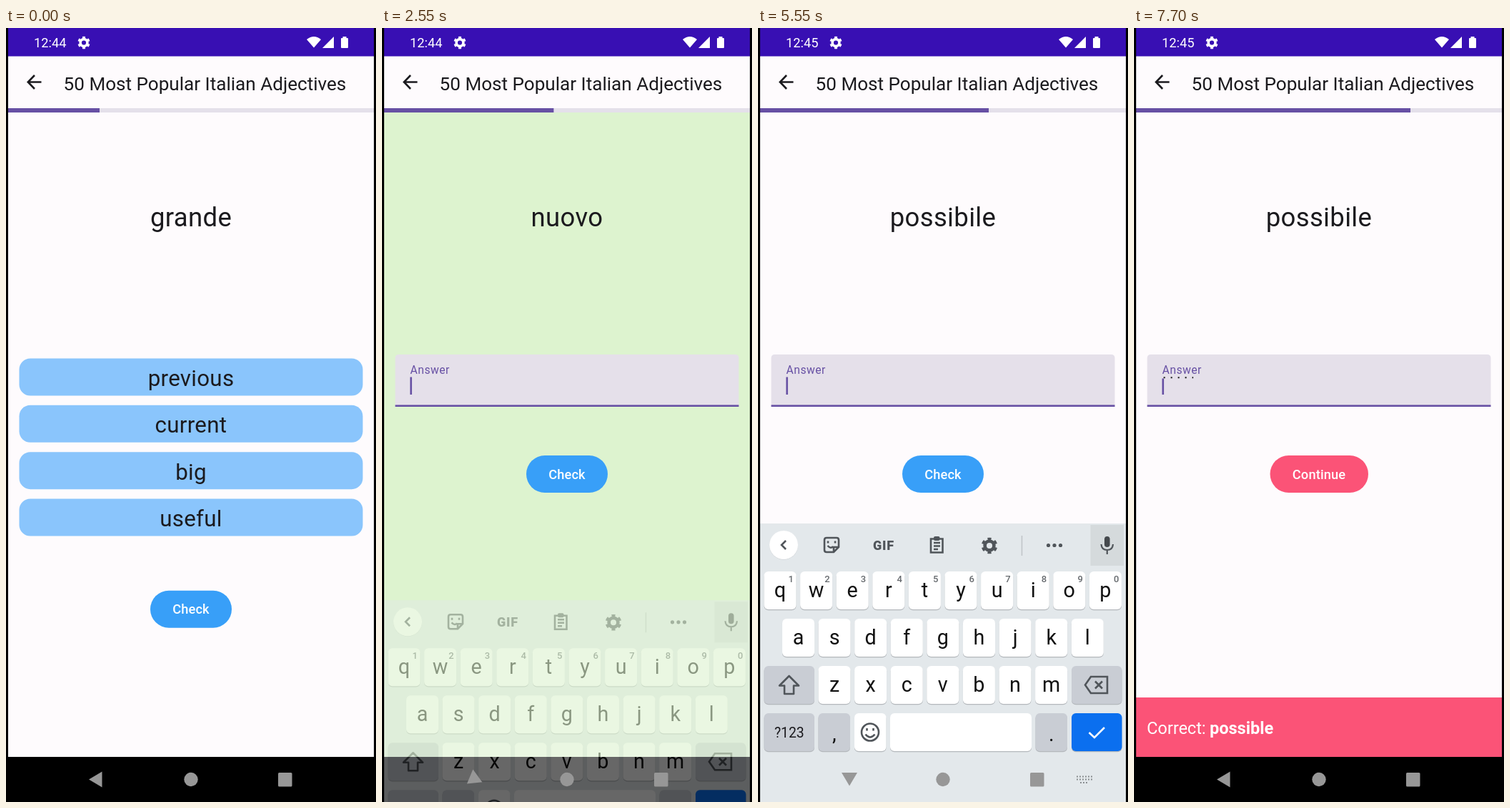
An HTML page for the animation above (8000 ms loop, 518x1081 px).

```html
<!DOCTYPE html>
<html lang="en">
<head>
<meta charset="utf-8">
<title>Vocabulary quiz</title>
<style>
  html, body { margin: 0; width: 100%; height: 100%; overflow: hidden; background: #000; }
  svg { display: block; width: 100%; height: 100%; font-family: Roboto, sans-serif; fill: #1b1a1e; }
  .mid { text-anchor: middle; }
  .word { font-size: 36.5px; letter-spacing: .35px; }
  .option { font-size: 31.3px; letter-spacing: .3px; }
  .button { font-size: 18.26px; font-weight: 500; letter-spacing: .13px; fill: #fff; }
  .line { fill: none; stroke: #50555a; stroke-width: 2.6; }
  .letter { font-size: 28.7px; fill: #111; }
  .hint { font-size: 13px; font-weight: 500; fill: #666a6e; }
  .suggestion { font-size: 20.9px; fill: #222; }
</style>
</head>
<body>
<svg viewBox="0 0 518 1081" preserveAspectRatio="none">
  <defs>
    <g id="gear" fill="none">
      <circle r="4.9" stroke-width="3.6"/>
      <circle r="7.3" stroke-width="2.8" pathLength="12" stroke-dasharray="1 1" stroke-dashoffset="-.5"/>
    </g>
    <clipPath id="screen"><rect x="3" width="512" height="1081"/></clipPath>
  </defs>
  <rect width="518" height="1081" fill="#000"/>
  <g clip-path="url(#screen)">
    <rect y="39" width="518" height="979" fill="#fefbfd"/>
    <rect id="page" y="118" width="518" height="900"/>

    <rect width="518" height="39.5" fill="#380fb3"/>
    <g fill="#fff">
      <text id="clock" x="39" y="27" font-size="18.26"></text>
      <use href="#gear" x="109" y="20.5" stroke="#fff"/>
      <path d="M421 16Q431 8 441 16L431 27.5ZM443 28H459V12ZM471.5 14V12H476.5V14H478Q479 14 479 15V27Q479 28 478 28H470Q469 28 469 27V15Q469 14 470 14Z"/>
    </g>
    <path class="line" style="stroke:#1b1a1e" d="M49.5 75.5H31M40 66L30.8 75.5 40 85"/>
    <text x="80.6" y="86.5" font-size="26.1">50 Most Popular Italian Adjectives</text>
    <rect y="112" width="518" height="6" fill="#e4e0ea"/>
    <rect id="progress" x="3" y="112" height="6" fill="#6750a4"/>

    <text id="word" class="mid word" x="259" y="277"></text>
    <g id="options"></g>
    <g id="field">
      <path d="M18.5 529V461Q18.5 456 23.5 456H494.5Q499.5 456 499.5 461V529Z" fill="#e5e0ea"/>
      <rect x="18.5" y="526.4" width="481" height="2.6" fill="#6750a4"/>
      <text x="39.5" y="482.5" font-size="15.65" letter-spacing=".52" style="fill:#6750a4">Answer</text>
      <text id="typed" x="40" y="507" font-size="20.9" letter-spacing=".65"></text>
      <path id="wrapped" d="M41.5 488.3H83" stroke="#111" stroke-width="2" stroke-dasharray="2 8"/>
      <rect id="cursor" x="39.3" width="2.6" fill="#6750a4"/>
    </g>
    <g id="button">
      <rect id="pill" y="-26" height="52" rx="26"/>
      <text id="action" class="mid button" x="259" y="6.7"></text>
    </g>

    <g id="banner">
      <rect y="935" width="518" height="84" fill="#fb5377"/>
      <text x="18" y="986" font-size="23.5" fill="#fff">Correct: <tspan x="106" font-weight="700">possible</tspan></text>
    </g>
    <rect y="1018" width="518" height="63" fill="#000"/>

    <g id="keyboard">
      <rect y="692" width="518" height="400" fill="#e3e8eb"/>
      <rect x="465.5" y="694" width="46.5" height="57" fill="#d5dadc"/>
      <circle cx="36" cy="722.5" r="20" fill="#c8ccd0"/>
      <circle cx="36" cy="722" r="20" fill="#fff"/>
      <path id="chevron" class="line" d="M39 716L33 722 39 728"/>
      <g id="tools">
        <path class="line" d="M96 712H110Q113 712 113 715V725L106 732H96Q93 732 93 729V715Q93 712 96 712ZM106 732V725H113M97.5 723Q102 728 105 724M98 716.5V719.5M108 716.5V719.5"/>
        <text class="mid" x="176" y="728.5" font-size="18" font-weight="900" letter-spacing=".8" style="fill:#50555a">GIF</text>
        <path class="line" d="M242 713.5H258.500V732.500H242ZM246 719H255M246 723.500H255M246 728H252M246 713.500H255" />
        <rect x="246" y="710" width="8.500" height="6" rx="2" fill="#50555a"/>
        <use href="#gear" transform="translate(324 723) scale(1.3)" stroke="#50555a"/>
        <rect x="368.700" y="709" width="1.500" height="28" fill="#c0c4c8"/>
        <g fill="#50555a"><circle cx="406.500" cy="722.500" r="2.600"/><circle cx="415" cy="722.500" r="2.600"/><circle cx="423.500" cy="722.500" r="2.600"/></g>
      </g>
      <g id="suggestions"></g>
      <rect x="485" y="710" width="7.600" height="15" rx="3.800" fill="#45494d"/>
      <path class="line" style="stroke-width:2.200" d="M480.500 721Q481 729 488.800 729T497 721M488.800 729V735"/>
      <g id="keys"></g>
      <path class="line" d="M43.500 905L57 918.500H50V930H37V918.500H30Z" stroke-linejoin="round"/>
      <path class="line" d="M466 906H489V929H466L458 917.500ZM472 912.500L482 922.500M482 912.500L472 922.500"/>
      <circle class="line" cx="157" cy="983.500" r="12"/>
      <path class="line" d="M150.500 986.500Q157 994.500 163.500 986.500M152.500 978V981.500M161.500 978V981.500"/>
      <path class="line" style="stroke:#fff" d="M463.500 984L471 991 485 977"/>
    </g>

    <g fill="#979797">
      <path id="back" d="M116 1049.500L134.500 1038.500V1060.500Z"/>
      <circle cx="259" cy="1049.500" r="9.700"/>
      <rect x="381" y="1040" width="19.500" height="19.500" rx="1.500"/>
    </g>
    <path id="switcher" d="M446 1045.500H468M446 1049.500H468M451 1054H463" stroke="#8b8f92" stroke-width="2" stroke-dasharray="2 2"/>
  </g>
</svg>
<script>
const LOOP = 8000;
const $ = id => document.getElementById(id);
const set = (id, attrs) => Object.entries(attrs).forEach(([k, v]) => $(id).setAttribute(k, v));
const show = (id, on) => set(id, { visibility: on ? 'visible' : 'hidden' });
const label = (id, text) => { if ($(id).textContent !== text) $(id).textContent = text; };
const clamp = x => Math.min(1, Math.max(0, x));

// Critically damped spring from 0 to 1; rate is in 1/s.
const spring = (ms, rate) => {
  const x = Math.max(0, ms) / 1000 * rate;
  return 1 - (1 + x) * Math.exp(-x);
};
// The last entry whose time has come.
const latest = (list, t) => list.filter(e => e[0] <= t).pop();

const PAPER = [254, 251, 253], GREEN = [221, 243, 207], RED = [255, 203, 188];
const mix = (a, b, k) => `rgb(${a.map((v, i) => Math.round(v + (b[i] - v) * k))})`;

// Each answer advances the bar and flashes the page.
const answers = [
  { shown: 550, start: 550, tint: GREEN },
  { shown: 2200, start: 2200, tint: GREEN },
  { shown: 4300, start: 4325, tint: GREEN },
  { shown: 6700, start: 6540, tint: RED }
];
const questions = [
  [0, 'grande', ['previous', 'current', 'big', 'useful']],
  [550, 'diritto', ['straight', 'moral', 'obvious', 'present']],
  [2250, 'nuovo'],
  [4325, 'possibile']
];
const typing = [
  [0, ''], [3850, 'n'], [3900, 'ne'], [4050, 'new'], [4325, ''],
  [5850, 'a'], [6200, 'as'], [6300, 'asd'], [6450, 'asdf'], [6700, '']
];
const hints = [
  [0, null], [3900, ['no', 'new', 'need']], [4050, ['new', 'news', 'newer']], [4325, null],
  [6000, ['a', 'and', 'as']], [6200, ['as', 'ask', 'add']], [6450, ['asdf', 'as if', 'aside']],
  [6700, ['', '', '']]
];
const blinks = [
  [0, 0], [2500, 1], [3000, 0], [3500, 1], [5050, 0], [5550, 1], [7200, 0], [7700, 1]
];

function buildKeys() {
  const STEP = 50.6;
  let out = '';
  const key = (x, y, w, fill, text = '', cls = 'letter', baseline = 35.5, h = 53) => {
    out += `<rect x="${x}" y="${y + 1.2}" width="${w}" height="${h}" rx="6" fill="#b4b8bc"/>
      <rect x="${x}" y="${y}" width="${w}" height="${h}" rx="6" fill="${fill}"/>
      <text class="mid ${cls}" x="${x + w / 2}" y="${y + baseline}">${text}</text>`;
  };
  [['qwertyuiop', 8.5, 759], ['asdfghjkl', 34, 825], ['zxcvbnm', 84.5, 891]].forEach(([row, x, y]) =>
    [...row].forEach((c, i) => key(x + i * STEP, y, 45, '#fff', c)));
  for (let i = 0; i < 10; i++)
    out += `<text class="mid hint" x="${46.3 + i * STEP}" y="773.5">${(i + 1) % 10}</text>`;
  const grey = '#c9cdd4';
  key(8.5, 891, 70.5, grey);
  key(439, 891, 70.5, grey);
  key(8.5, 957, 70.5, grey, '<tspan font-size="19.3">?123</tspan>', '', 34);
  key(84.5, 957, 44.5, grey, ',', 'letter', 38);
  key(135, 957, 44.5, '#fff');
  key(185, 957, 198, '#fff');
  key(388.5, 957, 44.5, grey, '.', 'letter', 39);
  key(439, 957, 70.5, '#0b6fef');
  $('keys').innerHTML = out;
}

function buildRows() {
  $('options').innerHTML = [0, 1, 2, 3].map(i => {
    const y = 461.5 + i * 65.33;
    return `<rect x="18.5" y="${y}" width="481" height="52" rx="15.5" fill="#8ac5fc"/>
      <text id="option${i}" class="mid option" x="259" y="${y + 38.5}"></text>`;
  }).join('');
  $('suggestions').innerHTML = [0, 1, 2].map(i =>
    `<text id="hint${i}" class="mid suggestion" x="${131 + i * 133.5}" y="729"></text>`).join('');
}

function drawPage(t) {
  let progress = .25, page = mix(PAPER, PAPER, 0);
  for (const { shown, start, tint } of answers) {
    if (t < shown) continue;
    const age = t - start;
    progress += .125 * (age > 760 ? 1 : spring(age, Math.sqrt(50)));
    if (age < 700) page = mix(PAPER, tint, clamp(1 - Math.abs(age - 350) / 350));
  }
  set('progress', { width: 512 * progress });
  set('page', { fill: page });
  label('clock', t < 4850 ? '12:44' : '12:45');

  const [, word, options] = latest(questions, t);
  label('word', word);
  $('options').style.display = options ? '' : 'none';
  $('field').style.display = options ? 'none' : '';
  if (options) options.forEach((text, i) => label('option' + i, text));

  const wrong = t >= 6700;
  set('button', { transform: `translate(0 ${options ? 811.7 : 623})` });
  set('pill', { x: wrong ? 190.5 : 202, width: wrong ? 137.5 : 114, fill: wrong ? '#fb5377' : '#389ff8' });
  label('action', wrong ? 'Continue' : 'Check');
  const rise = spring(t - 6835, 20);
  set('banner', { transform: `translate(0 ${83 * (1 - rise)})`, opacity: rise });
}

function drawInput(t) {
  const text = latest(typing, t)[1], wrapped = t >= 6700;
  label('typed', text);
  $('wrapped').style.display = wrapped ? '' : 'none';
  set('cursor', {
    x: 39.3 + (text ? $('typed').getComputedTextLength() : 0),
    y: wrapped ? 489.5 : 487.5,
    height: wrapped ? 22.5 : 24.5,
    opacity: latest(blinks, t)[1]
  });

  const words = latest(hints, t)[1];
  $('tools').style.display = words ? 'none' : '';
  $('suggestions').style.display = words ? '' : 'none';
  if (words) words.forEach((w, i) => label('hint' + i, w));
  set('chevron', { transform: words ? 'rotate(180 36 722)' : '' });
}

function drawKeyboard(t) {
  const hidden = t < 4000 ? 1 - clamp((t - 2450) / 250) : clamp((t - 6725) / 250);
  set('keyboard', { transform: `translate(0 ${180 * hidden})`, opacity: 1 - hidden });
  set('back', { transform: `rotate(${-90 * (1 - hidden)} 126.5 1048)` });
  set('switcher', { opacity: clamp(1 - 3 * hidden) });
}

function frame() {
  const t = performance.now() % LOOP;
  drawPage(t);
  drawInput(t);
  drawKeyboard(t);
  requestAnimationFrame(frame);
}

buildKeys();
buildRows();
frame();
</script>
</body>
</html>
```
